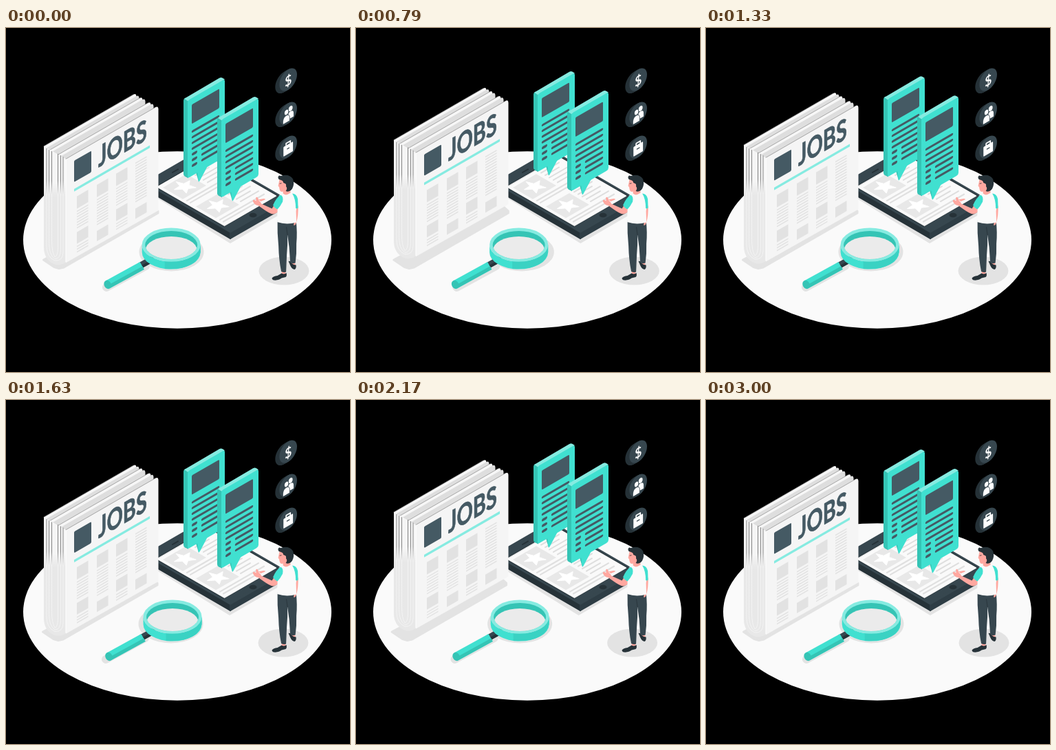
These frames come from a looping animation (500 by 500 pixels, 3040 ms). An HTML page with a canvas:

```html
<!DOCTYPE html>
<html lang="en">
<head>
<meta charset="utf-8">
<title>Jobs</title>
<style>
html, body { margin: 0; width: 100%; height: 100%; overflow: hidden; background: #000; }
canvas { display: block; width: 500px; height: 500px; }
</style>
</head>
<body>
<canvas id="stage"></canvas>
<script>
const canvas = document.getElementById('stage');
const ctx = canvas.getContext('2d');
const ratio = window.devicePixelRatio || 1;
canvas.width = canvas.height = 500 * ratio;

const K = 0.577;
const TEAL = '#40e0d0', TEAL_LIGHT = '#86ebe1', TEAL_DARK = '#35c4b5';
const SLATE = '#455a64', STEEL = '#37474f', INK = '#263238';
const SKIN = '#ffa8a0', SHADE = '#e3e3e3';

// ---------- helpers ----------
function path(d, fill, stroke, width = 1) {
  const p = new Path2D(d);
  if (fill) { ctx.fillStyle = fill; ctx.fill(p); }
  if (stroke) { ctx.strokeStyle = stroke; ctx.lineWidth = width; ctx.stroke(p); }
}

function poly(pts, fill, round = 0) {
  ctx.beginPath();
  pts.forEach((p, i) => i ? ctx.lineTo(p[0], p[1]) : ctx.moveTo(p[0], p[1]));
  ctx.closePath();
  ctx.fillStyle = fill;
  ctx.fill();
  if (round) {
    ctx.strokeStyle = fill;
    ctx.lineWidth = round;
    ctx.stroke();
  }
}

function oval(x, y, rx, ry, fill) {
  ctx.beginPath();
  ctx.ellipse(x, y, rx, ry, 0, 0, Math.PI * 2);
  ctx.fillStyle = fill;
  ctx.fill();
}

function box(x, y, w, h, fill, r = 0) {
  ctx.beginPath();
  ctx.roundRect(x, y, w, h, r);
  ctx.fillStyle = fill;
  ctx.fill();
}

function line(x1, y1, x2, y2, color, width) {
  ctx.beginPath();
  ctx.moveTo(x1, y1);
  ctx.lineTo(x2, y2);
  ctx.strokeStyle = color;
  ctx.lineWidth = width;
  ctx.stroke();
}

function group(draw, dx = 0, dy = 0) {
  ctx.save();
  ctx.translate(dx, dy);
  draw();
  ctx.restore();
}

// Upright isometric wall, x runs up and to the right.
function wall(x, y, draw, depth = 1) {
  ctx.save();
  ctx.transform(depth, -K * depth, 0, 1, x, y);
  draw();
  ctx.restore();
}

// ---------- motion ----------
function bezier(x, x1, y1, x2, y2) {
  const at = (s, a, b) => 3 * (1 - s) * (1 - s) * s * a + 3 * (1 - s) * s * s * b + s * s * s;
  let lo = 0, hi = 1;
  for (let i = 0; i < 24; i++) {
    const mid = (lo + hi) / 2;
    if (at(mid, x1, x2) < x) lo = mid; else hi = mid;
  }
  return at(lo, y1, y2);
}

const SHAKE = [0, -1, 2, -4, 4, -4, 4, -4, 2, -1, 0];

function shake(t, period) {
  const p = (t % period) / period * 10;
  const i = Math.floor(p);
  const e = bezier(p - i, 0.36, 0.07, 0.19, 0.97);
  return SHAKE[i] + (SHAKE[i + 1] - SHAKE[i]) * e;
}

function float(t) {
  const p = (t % 1500) / 750;
  return -10 * (p < 1 ? p : 2 - p);
}

// ---------- scene ----------
function shadows() {
  ctx.lineJoin = 'round';
  poly([[54.5, 337], [60, 334], [210, 256], [221, 266], [221, 269], [84, 348], [77, 349.5], [70, 347.5]], SHADE, 3);
  poly([[203, 236], [326, 312], [400, 269], [390, 255]], SHADE, 2);
  oval(240.5, 325.5, 47, 28, SHADE);
  ctx.lineCap = 'round';
  line(146, 377, 203, 346, SHADE, 12);
  oval(404, 353, 36.5, 20.5, SHADE);
}

function badge(y, draw) {
  for (let i = 7; i >= 0; i--) {
    wall(410.2 - i * 0.87, y + i * 0.5, () => {
      oval(0, 0, 14.8, 14.8, i ? INK : STEEL);
      if (!i) draw();
    }, 0.866);
  }
}

function badges() {
  badge(75, () => {
    ctx.fillStyle = '#fff';
    ctx.font = '700 20px Lato, sans-serif';
    ctx.textAlign = 'center';
    ctx.fillText('$', 0, 8.5);
  });
  badge(124, () => {
    oval(4, -5, 3.4, 3.8, '#fff');
    path('M0 9 V3 Q0 -1 4 -1 Q9 -1 9 4 V9 Z', '#fff');
    oval(-3, -3, 4, 4.4, STEEL);
    oval(-3, -3, 3.2, 3.6, '#fff');
    path('M-9 12 V8 Q-8.5 1.5 -3 1.5 Q2.5 1.5 2.5 8 V12 Z', '#fff', STEEL, 0.8);
  });
  badge(173, () => {
    path('M-3.5 -4 V-7 H3.5 V-4', null, '#fff', 2);
    box(-8, -4, 16, 14, '#fff', 1);
    line(-2, 2, 2, 2, STEEL, 1.5);
  });
}

function phone() {
  const at = (u, v) => [200 + u + v, 225 + (u - v) * K];
  const quad = (u1, v1, u2, v2, fill, r) =>
    poly([at(u1, v1), at(u2, v1), at(u2, v2), at(u1, v2)], fill, r);
  const bar = (u, v1, v2, fill, w) => line(...at(u, v1), ...at(u, v2), fill, w);
  ctx.lineJoin = 'round';
  poly([[202, 226], [326, 298], [326, 306], [202, 234]], INK, 2);
  poly([[326, 298], [406, 252], [406, 260], [326, 306]], '#2e3d45', 2);
  quad(2, 2, 124, 82, STEEL, 4);
  quad(14, 3.5, 113.5, 81, INK, 1);
  quad(15, 4.5, 113, 80, '#fafafa', 1);
  ctx.lineCap = 'round';
  bar(8, 34, 42, INK, 2);
  oval(359, 272, 5.5, 3.2, INK);

  for (const u of [20, 68]) {
    quad(u, 8, u + 29, 42, '#e8e8e8');
    for (let i = 0; i < 5; i++) bar(u + 2 + i * 6, 47, i % 2 ? 67 : 73, '#dedede', 2);
    bar(u + 34, 9, 73, '#e0e0e0', 2.2);
    bar(u + 39, 9, 60, '#e0e0e0', 2.2);
    const star = [];
    for (let i = 0; i < 10; i++) {
      const a = i * Math.PI / 5, r = i % 2 ? 5.2 : 12;
      star.push(at(u + 14.5 - Math.cos(a) * r, 25 + Math.sin(a) * r));
    }
    poly(star, '#fff', 1);
  }
}

function bubble(x, y) {
  // left edge and top rim
  path(`M${x - 6} ${y} Q${x - 6} ${y - 2.5} ${x - 3} ${y - 3.8} L${x + 1} ${y} V${y + 113} L${x - 4} ${y + 110.5} Q${x - 6} ${y + 109.5} ${x - 6} ${y + 107} Z`, TEAL_DARK);
  path(`M${x - 5} ${y - 2.5} L${x + 46} ${y - 32.5} Q${x + 48.5} ${y - 34} ${x + 51} ${y - 32.5} L${x + 54} ${y - 30.5} L${x + 2} ${y + 2} Z`, TEAL_LIGHT);
  path(`M${x + 11} ${y + 101} L${x + 16} ${y + 118} L${x + 20} ${y + 101} Z`, TEAL_DARK);
  wall(x, y, () => {
    box(0, 0, 54, 113, TEAL, 3);
    path('M14 112 L16 127.5 Q18 127 19 125 L29 112 Z', TEAL);
    box(6, 9.5, 40, 28, SLATE, 1.5);
    ctx.lineCap = 'round';
    for (let i = 0; i < 7; i++) {
      const ly = 49 + i * 8.3;
      if (i < 4) {
        line(7.5, ly, 44.5, ly, SLATE, 3.4);
      } else {
        line(8, ly, 12, ly, SLATE, 4);
        line(21.5, ly, 44.5, ly, SLATE, 3.4);
      }
    }
  });
}

function sheet(x, fill, edge) {
  const y = 172 + (x - 55) * K;
  path(`M${x} ${y} L${x + 130} ${y - 75} Q${x + 134.5} ${y - 77.5} ${x + 134.5} ${y - 72} V${y + 75} L${x} ${y + 151} Z`, fill);
  if (edge) path(`M${x} ${y} L${x + 130} ${y - 75}`, null, '#8a8a8a', 0.7);
}

function columns() {
  const gray = '#e2e2e2';
  const block = (x, y, h) => box(x, y, 16.5, h, gray);
  const rows = (x, from, to) => {
    for (let y = from; y <= to; y += 4) line(x, y, x + 16.5, y, gray, 1.7);
  };
  ctx.lineCap = 'butt';
  [16, 73].forEach(x => {
    block(x, 64, 18);
    rows(x, 86, 110);
    block(x, 116, 17);
    rows(x, 137, 147);
  });
  block(45, 64, 18);
  rows(45, 86, 124);
  rows(101, 65, 124);
  [45, 101].forEach(x => block(x, 131, 15));
}

function newspaper() {
  for (const x of [55, 64, 76]) {
    sheet(x, '#f7f7f7', true);
    sheet(x + 4, '#dedede');
  }

  // folded end
  const fade = ctx.createLinearGradient(0, 225, 0, 245);
  fade.addColorStop(0, '#f5f5f5');
  fade.addColorStop(1, '#e8e8e8');
  path('M55 172 L87 190.5 V341 Q78 347 69 343 Q55 336 55 319 Z', fade);
  const gap = ctx.createLinearGradient(0, 222, 0, 242);
  gap.addColorStop(0, '#777');
  gap.addColorStop(1, '#f4f4f4');
  for (const d of [4, 7.5, 11.5]) {
    const l = 55 + d, r = 87 - d;
    path(`M${l} ${173 + d * K} V${321 - d} Q${l} ${337 - d} 71 ${341 - d * 0.7} Q${r} ${343 - d} ${r} ${330 - d} V${190 - d * K}`, null, gap, 0.9);
  }

  sheet(87, '#f5f5f5', true);
  line(87, 191, 87, 340, '#fff', 1);
  wall(87, 190, () => {
    box(12, 10, 25, 31, SLATE, 1.5);
    box(12, 51, 110, 3.8, TEAL_LIGHT);
    columns();
  });
  wall(134, 203, () => {
    ctx.fillStyle = ctx.strokeStyle = SLATE;
    ctx.lineWidth = 0.8;
    ctx.font = '700 42px Lato, sans-serif';
    ctx.textAlign = 'left';
    ctx.fillText('JOBS', 0, 0);
    ctx.strokeText('JOBS', 0, 0);
  }, 0.69);
}

function magnifier() {
  // grip
  ctx.lineCap = 'butt';
  line(195, 345.5, 215, 334.5, STEEL, 9);
  line(196, 348, 214, 338, INK, 4);
  line(148, 373, 198, 345.5, TEAL, 12.5);
  line(150, 376, 200, 348.5, TEAL_DARK, 5);
  ctx.save();
  ctx.translate(148, 373);
  ctx.rotate(-0.5);
  oval(0, 0, 5, 6.4, TEAL_DARK);
  ctx.restore();

  // ring with an open lens
  path('M198 315 A42.5 24.5 0 0 0 283 315 V326 A42.5 24.5 0 0 1 198 326 Z', TEAL);
  path('M231 339 Q277 342 283 315 V326 Q277 352 231 350 Z', '#3ad2c3');
  oval(240.5, 315, 42.5, 24.5, TEAL_LIGHT);
  oval(240.5, 315.5, 38, 20.5, TEAL_DARK);
  ctx.save();
  ctx.beginPath();
  ctx.ellipse(240.5, 315.5, 38, 20.5, 0, 0, Math.PI * 2);
  ctx.clip();
  oval(240.5, 323, 37.5, 20, '#ebebeb');
  ctx.restore();
}

function man() {
  // shoes and ankles
  path('M400 352 H406 V358 H400 Z M413 337 L419 336 L420 345 L414 344 Z', SKIN);
  path('M386 363 Q388 360 394 359.5 L400 356 Q404 358 407 355.5 Q408 360 406 361.5 L400 363 Q396 366.5 389 366 Q386 365.5 386 363 Z', INK);
  path('M410 338.5 Q412 337.5 414 340.5 Q417 344 421 344 Q421.5 349 419 350.5 Q415 350 413 345.5 Z', INK);
  // trousers
  path('M394 279 H421 Q423 297 421.5 313 Q422 328 420 341 Q416 342.5 412.5 340.5 L411 318 L408.5 300 Q409 315 407.5 329 L406.5 354 Q403 355.5 399.5 353.5 Q396 337 395.5 316 Q393.5 297 394 279 Z', STEEL);
  path('M408.5 300 L407 289', null, INK, 0.8);
  // far arm
  path('M420.5 257 L424 258 Q424.5 272 421.5 282 Q420 287 417.5 286 L419.5 275 Z', SKIN);
  // near arm and hand
  path('M392 252 L402 258 Q395 269 388 270 Q383 270 371 261 L366 257.5 Q361 257 358.5 252 Q357.5 249.5 359.5 249 L363 251 L362.5 246.5 Q364 244 365.5 246.5 L367 250.5 Q370 252 370.5 255 L386 262 Z', SKIN);
  path('M366 249 L374 247.5 Q377 247.5 376 249 L370 251.5 Z', SKIN);
  // shirt
  path('M398.5 239.5 Q405 242 413 239 Q421 240 423 246 Q422.5 257 421 266 L421.5 282 Q407 286 393.5 281.5 L394 262 Q394 246 398.5 239.5 Z', '#fafafa');
  path('M398.5 242 Q403 244 401.5 252 Q398 259 394 263 Q390 261.5 387.5 257 Q392 246.5 398.5 242 Z', TEAL);
  path('M415.5 240 Q422 240.5 423.5 248 L424 261 Q422.5 262.5 420.5 261.5 Q420.5 248 415.5 240 Z', TEAL);
  // head
  path('M402 232 L412 230 L413 239 Q406 244 402 240 Z', SKIN);
  path('M397 219 Q396 225 395 229 L396.5 231 Q397 237 400 237.5 Q407 237 411 231 L411 219 Z', SKIN);
  path('M396 219.5 Q393.5 216 396.5 214 Q399 215 402 213.5 Q412 212 416.5 219 Q419 226 415.5 233 Q412 238.5 406 236.5 Q409 232 406.5 230 Q406 225 402.5 224.5 Q403 221 396 219.5 Z', INK);
  oval(404.5, 228.5, 2, 3, SKIN);
  path('M397.5 225.5 L399.5 225.2', null, INK, 0.8);
}

function draw(t) {
  ctx.setTransform(ratio, 0, 0, ratio, 0, 0);
  ctx.fillStyle = '#000';
  ctx.fillRect(0, 0, 500, 500);
  oval(249, 308, 224, 128.7, '#fafafa');
  group(shadows, shake(t, 1500));
  badges();
  phone();
  group(() => {
    bubble(264, 105.5);
    bubble(313, 133.5);
    newspaper();
  }, 0, float(t));
  group(magnifier, shake(t, 3000) - 0.3);
  group(man, 0.6, 0.6);
}

// 24 pictures a second, 73 pictures a loop
function frame(now) {
  const step = Math.min(72, Math.floor((now % 3040 + 4) * 0.024));
  draw(step * 1000 / 24 + 10);
  requestAnimationFrame(frame);
}
requestAnimationFrame(frame);
</script>
</body>
</html>
```
